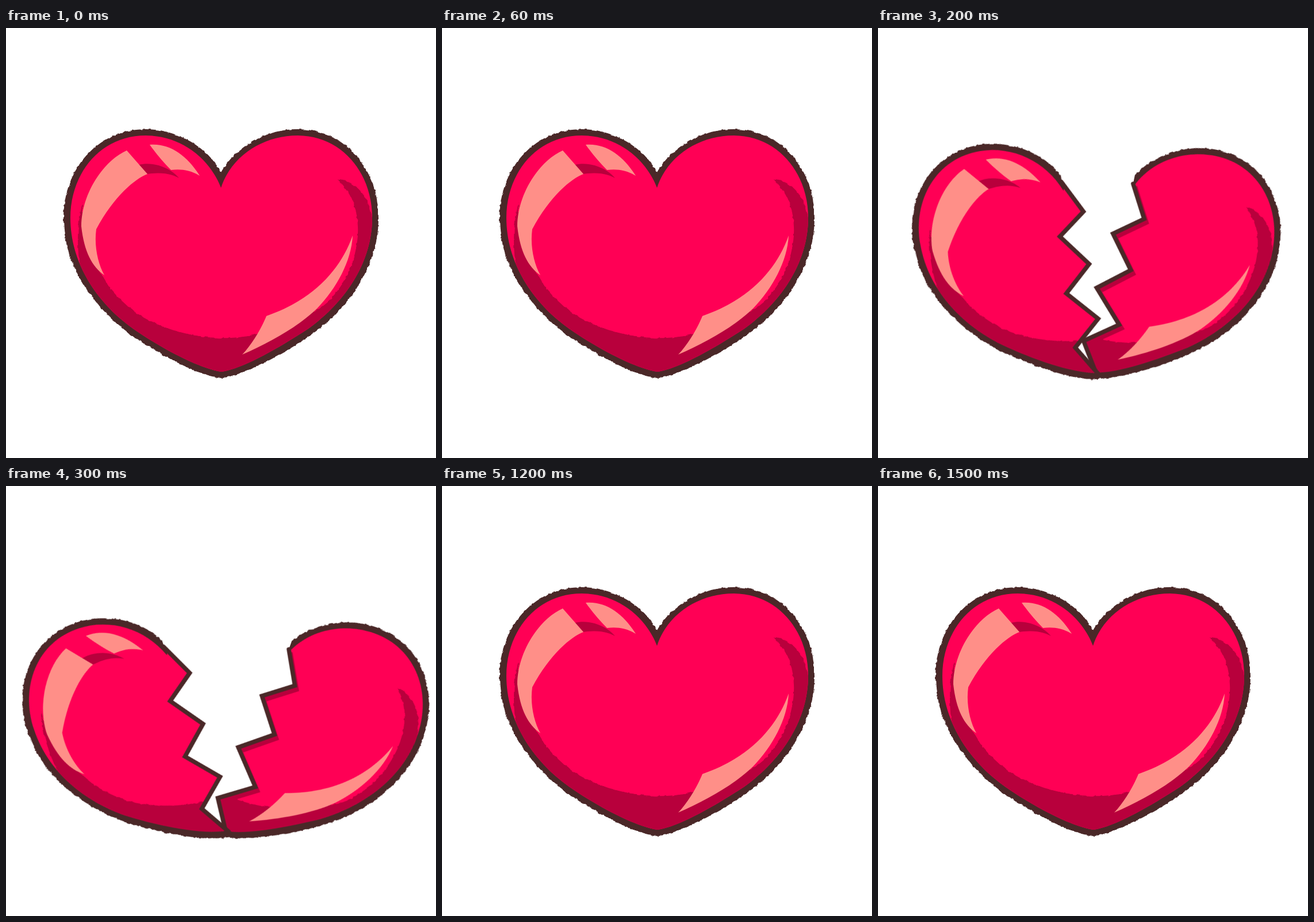
An HTML page that plays this animation: 748 by 748 pixels, repeating every 1.7 s.

```html
<!DOCTYPE html>
<html lang="en">
<head>
<meta charset="utf-8">
<title>Breaking heart</title>
<style>
  html, body { margin: 0; width: 100%; height: 100%; overflow: hidden; background: #fff; }
  svg { display: block; width: 100vw; height: 100vh; }
  .line { fill: #4a2828; }
  .base { fill: #ff0055; }
  .shade { fill: #b8003c; }
  .shine { fill: #ff8f88; }
  .crack { fill: none; stroke: #4a2828; stroke-width: 7.5; stroke-linecap: round; }
  .shadow { fill: none; stroke: #b8003c; stroke-width: 11; }
  #left { transform-origin: 293.6px 353.4px; }
  #right { transform-origin: 478.7px 398px; }
  #left, #right { visibility: hidden; }
</style>
</head>
<body>
<svg viewBox="0 0 748 748">
  <defs>
    <filter id="rough" filterUnits="userSpaceOnUse" x="0" y="0" width="748" height="748" color-interpolation-filters="sRGB">
      <feTurbulence type="fractalNoise" baseFrequency=".13" numOctaves="2" seed="4"/>
      <feDisplacementMap in="SourceGraphic" scale="4.5" xChannelSelector="R" yChannelSelector="G"/>
    </filter>
    <path id="inner" d="M374,278 C352,222 300,187 243,187 C165,187 112,252 112,330 C112,415 165,483 221,523
      C270,557 335,592 375,598 C415,592 480,553 526,523 C582,483 637,415 637,330
      C637,252 584,187 507,187 C448,187 392,222 374,278Z"/>
    <path id="rightEdge" d="M376,263 L407,319 359,355 402,411 350,453 401,508 346,548 380,601"/>
    <clipPath id="inside"><use href="#inner"/></clipPath>
    <clipPath id="leftSide"><path d="M374,0 V262 L402,319 354,355 396,410 348,454 395,506 347,549 379,600 V748 H0 V0Z"/></clipPath>
    <clipPath id="rightSide"><path d="M376,0 V263 L407,319 359,355 402,411 350,453 401,508 346,548 380,601 V748 H748 V0Z"/></clipPath>

    <g id="heart">
      <path class="line" filter="url(#rough)" d="M374,251 C350,205 295,176 243,176 C160,176 100,245 100,330
        C100,420 160,490 215,533 C265,566 330,604 375,609 C420,602 490,563 533,532
        C590,492 648,420 648,330 C648,245 590,176 507,176 C455,176 400,205 374,251Z"/>
      <use href="#inner" class="base"/>
      <g clip-path="url(#inside)">
        <path class="shade" filter="url(#rough)" d="M134,303 C122,340 122,400 134,432 L100,440 V640 H680 V330 H637
          C630,290 606,264 577,264 C606,290 616,330 611,370 C606,410 590,445 564,472
          C535,500 490,520 437,532 C380,548 300,537 240,504 C205,482 178,455 163,422 C142,390 130,350 134,303Z"/>
      </g>
      <path class="shade" d="M231,238 C255,232 285,242 301,261 C285,252 265,251 246,254Z"/>
      <path class="shine" d="M210,213 L246,254 C225,262 188,292 157,350 C153,380 160,410 171,430
        C150,415 136,390 131,345 C131,290 168,232 210,213Z"/>
      <path class="shine" d="M250,203 C285,200 315,222 337,257 C320,247 305,245 287,247 C275,235 262,220 250,203Z"/>
      <path class="shine" d="M603,361 C583,418 537,472 453,501 C443,525 428,550 411,568
        C460,547 510,518 541,488 C575,453 601,405 603,361Z"/>
    </g>
  </defs>

  <use id="whole" href="#heart"/>
  <g id="right">
    <g clip-path="url(#rightSide)">
      <use href="#heart"/>
      <g clip-path="url(#inside)">
        <use href="#rightEdge" class="shadow" x="3" y="5"/>
      </g>
    </g>
    <use href="#rightEdge" class="crack"/>
  </g>
  <g id="left">
    <g clip-path="url(#leftSide)"><use href="#heart"/></g>
    <path class="crack" d="M373,262 L402,319 354,355 396,410 348,454 395,506 347,549 379,601"/>
  </g>
</svg>
<script>
  const LOOP = 1700;
  const closed = 'none';

  // Each step: start time in ms, left pose, right pose (null = unbroken heart)
  const steps = [
    [0, null, null],
    [100, closed, closed],
    [200, 'translate(-37px,17.4px) matrix(.9848,-.16,.1736,.99,0,0)', 'translate(38.8px,25.8px) rotate(11.5deg)'],
    [300, 'translate(-65.6px,37.6px) matrix(.9455,-.304,.3176,.9545,0,0)', 'translate(65px,47.7px) rotate(19.5deg)'],
    [1200, null, null],
    [LOOP, null, null]
  ];

  function play(id, pose) {
    const frames = steps.map(step => ({ offset: step[0] / LOOP, easing: 'step-end', ...pose(step) }));
    document.getElementById(id).animate(frames, { duration: LOOP, iterations: Infinity });
  }

  const half = i => step => ({
    visibility: step[i] ? 'visible' : 'hidden',
    transform: step[i] || closed
  });

  play('whole', step => ({ visibility: step[1] ? 'hidden' : 'visible' }));
  play('left', half(1));
  play('right', half(2));
</script>
</body>
</html>
```
